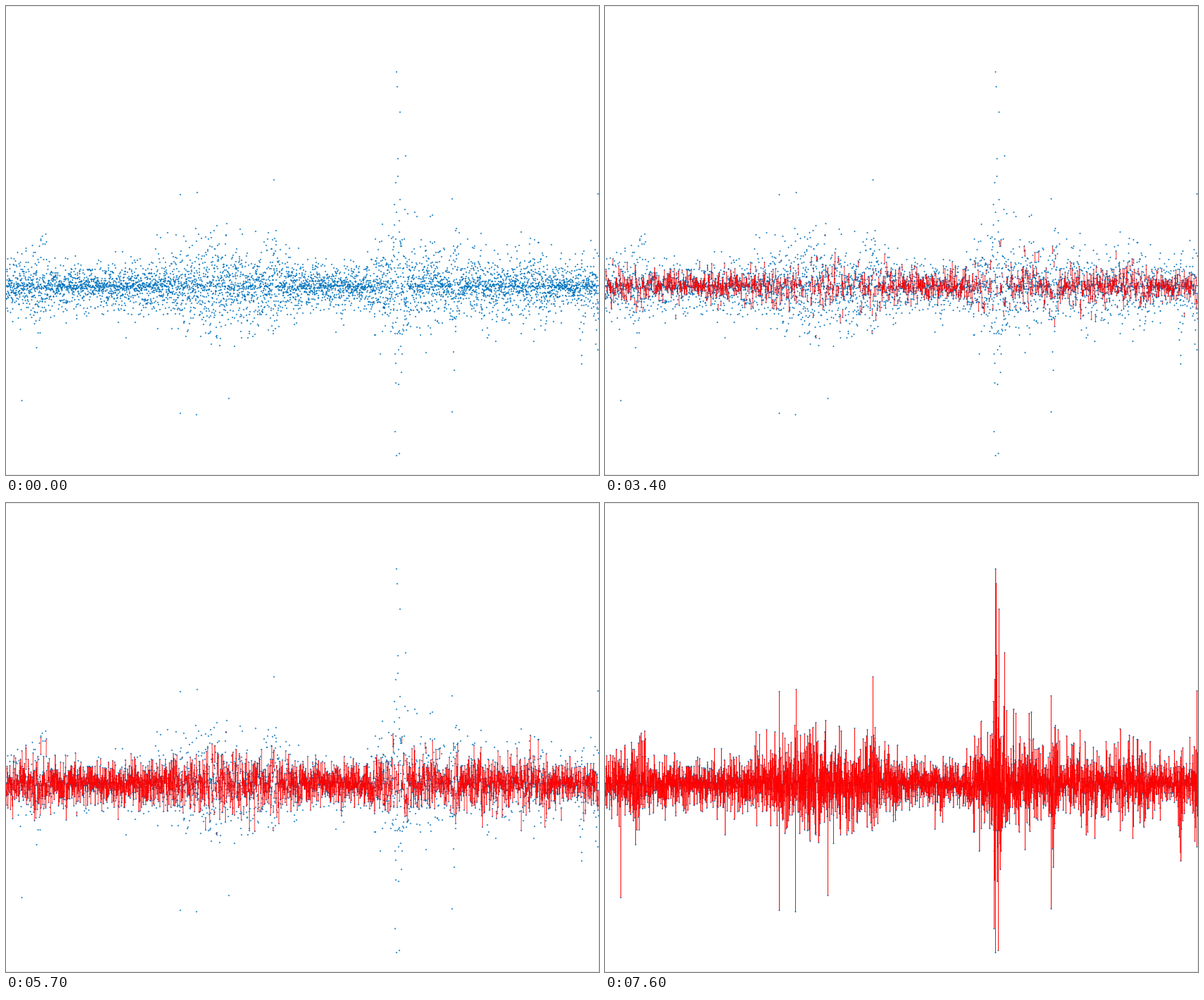
Write a matplotlib script that moves like this. It is 842 by 665 pixels and loops after 7700 ms.

```python
import numpy as np
import matplotlib.pyplot as plt
from matplotlib.animation import FuncAnimation
from matplotlib.collections import LineCollection
from matplotlib.patches import Rectangle

W, H, DPI = 842, 665, 64
PX = 72 / DPI  # points per pixel
FRAMES, INTERVAL = 77, 100
N, MID, CALM = 5400, 397, 12.5
BLUE, RED, EDGE = "#0072BD", "#FF0000", "#E8E8E8"

# Bursts of stronger noise: centre, width, extra spread
BURSTS = [
    (20, 32, 5), (47, 6, 9), (310, 58, 15), (382, 5, 14), (530, 9, 13),
    (557, 6, 52), (580, 18, 10), (601, 4, 14), (637, 4, 22), (690, 50, 5),
    (750, 14, 12), (818, 3, 17), (840, 3, 22),
]

# The few samples far outside the noise
PEAKS = [
    (22, 559), (247, 267), (247, 577), (270, 579), (271, 264), (316, 556),
    (380, 246), (554, 637), (554, 93), (555, 114), (556, 216), (558, 634),
    (567, 212), (633, 273), (633, 575), (840, 266),
]


def make_series():
    rng = np.random.default_rng(12)
    x = np.linspace(0, W - 1, N)
    spread = CALM + sum(h * np.exp(-0.5 * ((x - c) / w) ** 2)
                        for c, w, h in BURSTS)
    z = rng.standard_normal(N)
    # A power above one gives a dense core and long tails
    y = MID + spread * np.sign(z) * np.abs(z) ** 1.3
    last = -1
    for px, py in PEAKS:
        last = max(last + 1, round(px / (W - 1) * (N - 1)))
        y[last] = py
    return x, y


x, y = make_series()
points = np.column_stack([x, y]) + 0.5
links = np.stack([points[:-1], points[1:]], axis=1)
links = links[np.argsort(np.abs(np.diff(y)), kind="stable")]

fig = plt.figure(figsize=(W / DPI, H / DPI), dpi=DPI, facecolor="white")
ax = fig.add_axes([0, 0, 1, 1])
ax.set(xlim=(0, W), ylim=(H, 0))
ax.axis("off")

for box in [(0, 0, W, 1), (0, H - 1, W, 1), (W - 1, 0, 1, H)]:
    ax.add_patch(Rectangle(box[:2], *box[2:], color=EDGE, lw=0))

# Markers snap to whole pixels: a full centre with four soft arms
ax.plot(x, y, "+", color=BLUE, ms=2 * PX, mew=PX, zorder=2)
lines = LineCollection([], colors=RED, linewidths=0.8 * PX,
                       capstyle="butt", zorder=3)
ax.add_collection(lines, autolim=False)


def draw(k):
    """Show the shortest links first, an equal share per step."""
    lines.set_segments(links[:len(links) * k // (FRAMES - 1)])
    return [lines]


anim = FuncAnimation(fig, draw, frames=FRAMES, interval=INTERVAL,
                     init_func=lambda: draw(0), repeat=True, repeat_delay=0)
plt.show()
```
